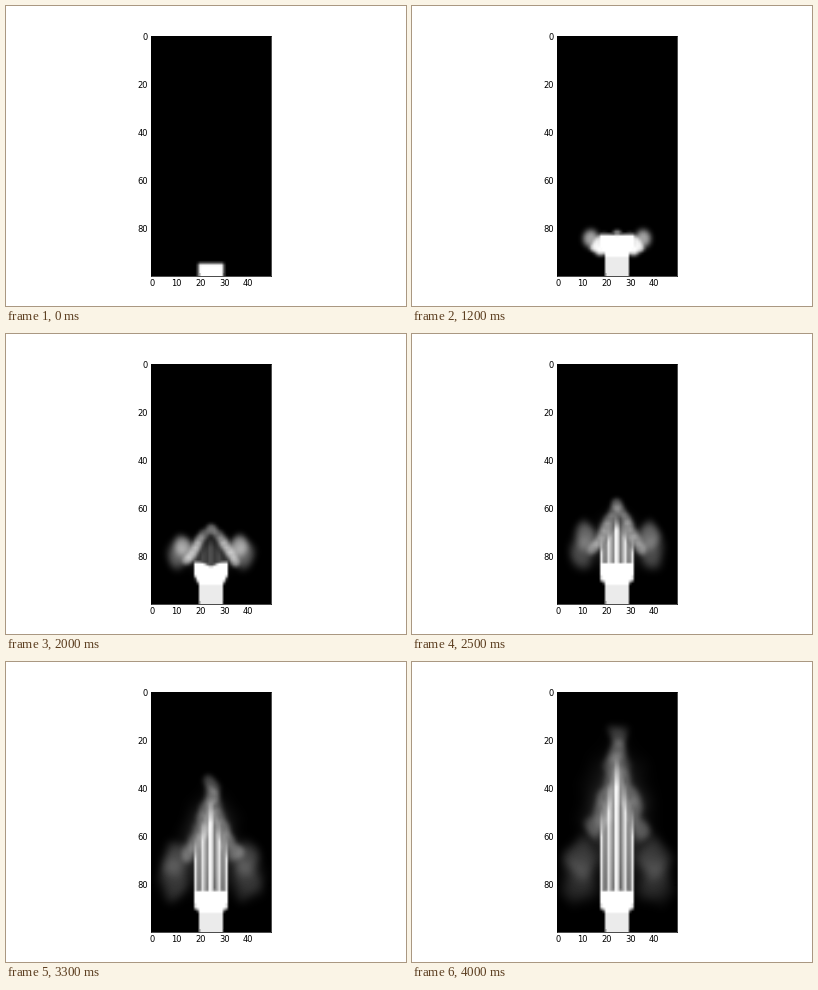
These frames come from a looping animation (400x300 px, 4.1 s). A matplotlib script:

```python
import numpy as np
import matplotlib.pyplot as plt
from matplotlib.animation import FuncAnimation

COLS, ROWS = 50, 100
FRAMES, INTERVAL = 41, 100
BASE = 94.0      # row where the smoke leaves the nozzle
LEVELS = 7       # puffs along each side of the plume

plt.style.use("classic")
plt.rcParams.update({
    "font.family": "DejaVu Sans",
    "font.size": 12,
    "text.hinting": "force_autohint",
    "figure.facecolor": "white",
    "savefig.dpi": "figure",
})

# u is the distance from the nozzle axis, y the row counted from the top
y, u = np.mgrid[0:ROWS, 0:COLS].astype(float)
u -= (COLS - 1) / 2

jitter = np.random.default_rng(4).uniform(-1, 1, (LEVELS, 2))


def ramp(n, start, end, low=0.0, high=1.0):
    return np.interp(n, (start, end), (low, high))


def edge(d, soft=1.0):
    return np.clip(d / soft + .5, 0, 1)


def rise(n):
    """Rows climbed by the tip of the plume."""
    return .63 * n + .032 * n ** 2


def puff(px, py, cx, cy, rx, ry, density):
    r2 = ((px - cx) / rx) ** 2 + ((py - cy) / ry) ** 2
    return density * np.exp(-r2 ** 1.6)


def ring(n, birth, stall):
    """Vortex ring seen side-on: it spreads, stalls and thins out."""
    age = max(n - birth, 0)
    cx = 16 * (1 - np.exp(-age / 10.5))
    cy = stall + (BASE - stall) * np.exp(-(age / 12) ** 2)
    rx = 1.7 + .14 * age
    ry = rx * ramp(age, 8, 16, 1, 1.25)
    density = ramp(age, 0, 6) * (8 / max(age, 8)) ** 1.1
    return [(side * cx, cy, rx, ry, density) for side in (-1, 1)]


def plume(n):
    """Puffs that follow the tip, each at a fixed share of its height."""
    h = rise(n)
    power = ramp(n, 16, 33, .3, 1.5)
    fade = ramp(n, 6, 14) * 11 / max(n, 11)
    puffs = []
    for s, shifts in zip(np.linspace(0, 1, LEVELS), jitter):
        spread = 9.5 * s ** power
        density = fade * (.45 + .55 * min(1, 2 * s))
        for side, shift in zip((-1, 1), shifts):
            puffs.append((side * spread + .015 * h * shift,
                          BASE - (1 - s / 2) * h + .02 * h * s * shift,
                          1.5 + .03 * h, 1 + .05 * h, density))
    haze = (0, BASE - .55 * h, 5 + .1 * h, 1 + .3 * h, .18 * ramp(n, 8, 16))
    return puffs + [haze]


def smoke(n):
    # turbulence grows with the plume
    swirl = ramp(n, 12, 33, 0, .9)
    px = u + swirl * np.sin(.4 * y + .3 * n) * np.cos(.2 * u + .1 * n)
    py = y + swirl * np.sin(.45 * u - .2 * n) * np.cos(.2 * y + .25 * n)
    clear = np.ones_like(u)
    for args in ring(n, 0, 78) + ring(n, 6, 69) + plume(n):
        clear *= 1 - puff(px, py, *args)
    return 1 - clear


def jet(n):
    h = rise(n)
    streaks = .62 + .27 * np.cos(2 * np.pi * u / 3.3)
    core = .25 * np.exp(-((u + .6) / .8) ** 2)
    tip = BASE - .82 * h + .045 * h * abs(u)
    shape = edge(7 - abs(u)) * edge(y - tip, 1 + .15 * h) * edge(90 - y)
    return ramp(n, 19, 25) * shape * np.clip(streaks + core, 0, 1)


def body(n):
    half = min(7, 5 + .19 * n)
    top = max(82, 94.3 - rise(n))
    dip = 2 * np.exp(-((n - 18) / 4) ** 2 - (u / 2.5) ** 2)
    width = half - (half - 5) * np.clip((y - 87.5) / 4, 0, 1)
    return edge(width - abs(u)) * edge(y - top - dip, 1.4) * edge(92 - y)


def stem(n):
    soft = ramp(n, 0, 4, 1.5, 1)
    half = ramp(n, 0, 4, 5.2, 5)
    top = ramp(n, 0, 8, 94.3, 89.5)
    value = ramp(n, 0, 8, 1, .92)
    return value * edge(half - abs(u), soft) * edge(y - top, soft)


def density(n):
    cloud = 1 - (1 - smoke(n)) * (1 - jet(n))
    cloud = np.maximum(cloud, body(n))
    # the nozzle hides the smoke behind it
    cover = edge(5 - abs(u)) * edge(y - 91.5) * ramp(n, 4, 8)
    return np.maximum(cloud * (1 - cover), stem(n))


fig = plt.figure(figsize=(8, 6), dpi=50)
ax = fig.add_axes((.3625, .1, .2999, .8))
image = ax.imshow(density(0), cmap="gray", vmin=0, vmax=1,
                  interpolation="bilinear", aspect="auto")
ax.set_xticks(range(0, COLS, 10))
ax.set_yticks(range(0, ROWS, 20))


def update(n):
    image.set_data(density(n))
    return [image]


anim = FuncAnimation(fig, update, frames=FRAMES, interval=INTERVAL,
                     repeat=True, repeat_delay=0)
plt.show()
```
